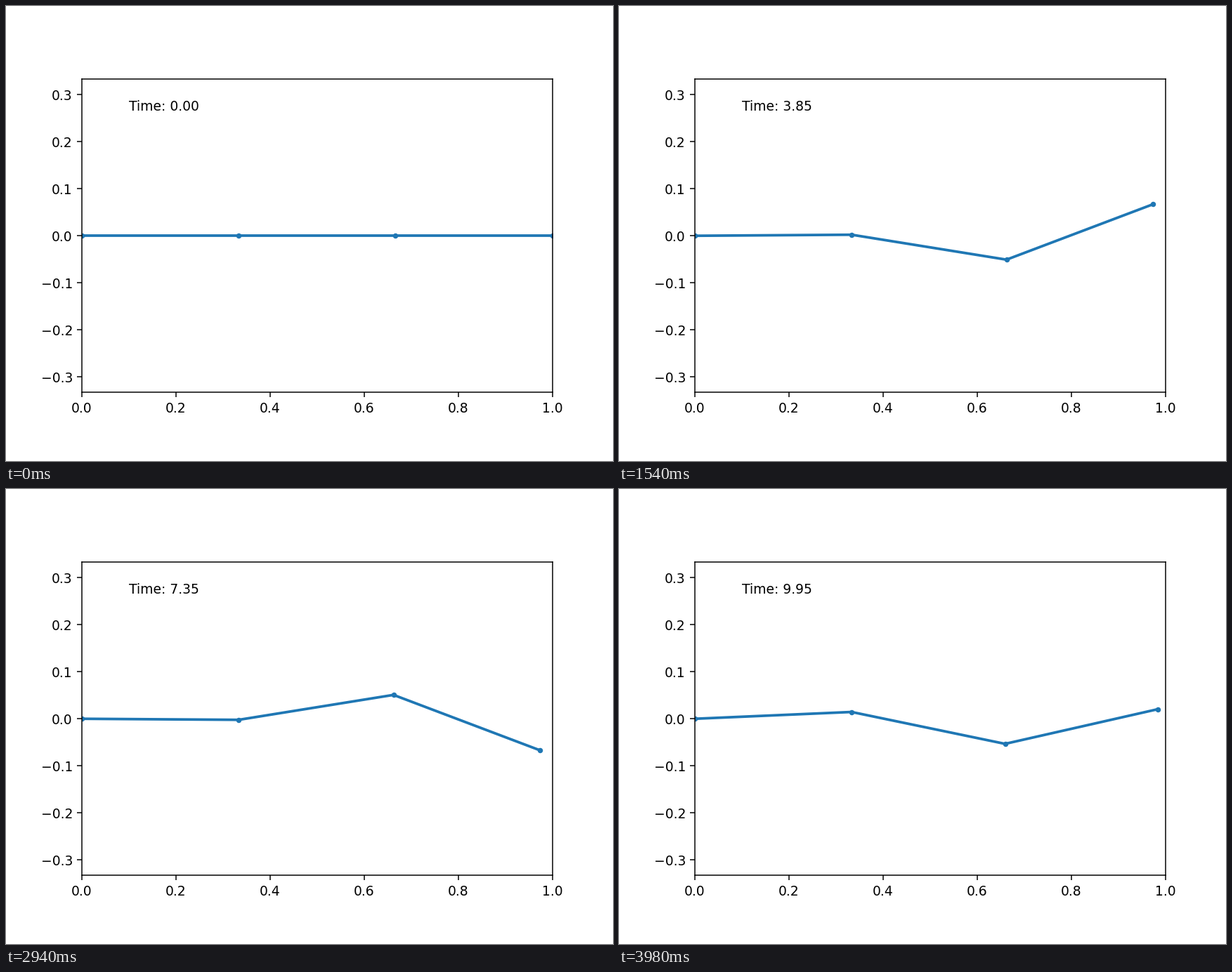
Write a matplotlib script that moves like this. It is 864 px wide and 648 px high and loops after 4000 ms.

```python
import numpy as np
import matplotlib.pyplot as plt
from matplotlib.animation import FuncAnimation

FRAMES = 200
DT = 0.05
LINK = 1 / 3
RISE = 2.8  # rate at which the swing builds up from rest

# Heading of each link: cosine and sine amplitude of a 1 Hz swing
COS = np.array([0.0563, -0.1979, 0.1170])
SIN = np.array([0.0327, 0.0536, -0.3621])

plt.rcParams["font.family"] = "DejaVu Sans"
fig, ax = plt.subplots(figsize=(6.4, 4.8), dpi=135)
ax.set_aspect("equal")
ax.set_xlim(0, 1)
ax.set_ylim(-LINK, LINK)
ax.set_xticks(np.arange(6) / 5)
ax.set_yticks(np.arange(-3, 4) / 10)

chain, = ax.plot([], [], ".-", color="#1f77b4", lw=2, ms=6)
clock = ax.text(0.1, 0.9, "", transform=ax.transAxes)


def headings(t):
    gain = 1 - (1 + RISE * t) * np.exp(-RISE * t)
    phase = 2 * np.pi * t
    return gain * (COS * np.cos(phase) + SIN * np.sin(phase))


def joints(t):
    angle = headings(t)
    x = np.append(0, np.cumsum(LINK * np.cos(angle)))
    y = np.append(0, np.cumsum(LINK * np.sin(angle)))
    return x, y


def update(i):
    t = i * DT
    chain.set_data(*joints(t))
    clock.set_text(f"Time: {t:.2f}")
    return chain, clock


anim = FuncAnimation(fig, update, frames=FRAMES, interval=20,
                     repeat=True, repeat_delay=0)
plt.show()
```
